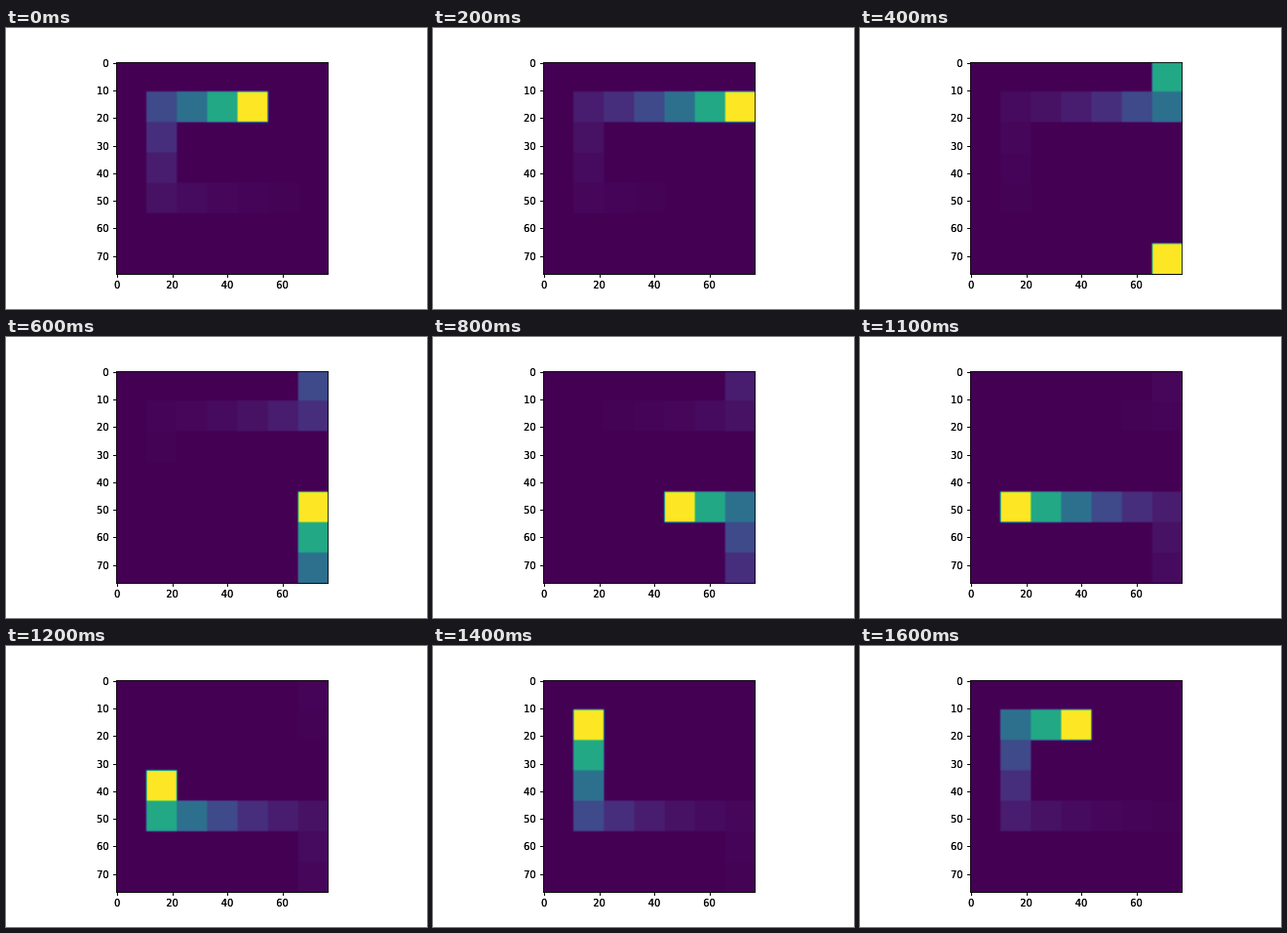
These frames come from a looping animation (432 px wide and 288 px high, 1.7 s). An HTML page with a canvas:

```html
<!DOCTYPE html>
<html lang="en">
<head>
<meta charset="utf-8">
<title>Fading trail on a grid</title>
<style>
  html, body { margin: 0; width: 100%; height: 100%; overflow: hidden; background: #fff; }
  canvas, svg { position: absolute; left: 0; top: 0; display: block; }
  text { font: 10px "DejaVu Sans", sans-serif; fill: #000; }
</style>
</head>
<body>
<canvas id="heat" width="432" height="288"></canvas>
<svg id="axes" width="432" height="288" viewBox="0 0 432 288"></svg>
<script>
const STEP = 100, DECAY = 0.6;
const CELLS = 7, UNITS = 11;             // 7 x 7 cells, 11 data units each
const BOX = { x: 113, y: 35, w: 218, h: 217 };
const ORIGIN_Y = 34, SCALE = 218 / (CELLS * UNITS);

// The walk wraps from the top edge to the bottom one.
const path = [];
function walk(x, y, dx, dy, n) {
  for (let i = 0; i < n; i++) path.push([x + dx * i, (y + dy * i + CELLS) % CELLS]);
}
walk(4, 1, 1, 0, 2);
walk(6, 1, 0, -1, 4);
walk(6, 4, -1, 0, 5);
walk(1, 4, 0, -1, 3);
walk(1, 1, 1, 0, 3);

// Colour map: level, red, green, blue
const stops = [
  [0, 68, 1, 84], [4, 70, 7, 90], [11, 71, 17, 100], [19, 72, 28, 110],
  [33, 71, 46, 124], [55, 62, 74, 137], [92, 45, 112, 142], [128, 33, 145, 140],
  [153, 34, 168, 132], [191, 94, 201, 98], [230, 189, 223, 38], [255, 253, 231, 37]
];
const palette = Array.from({ length: 256 }, (_, level) => {
  const i = Math.max(1, stops.findIndex(s => s[0] >= level));
  const a = stops[i - 1], b = stops[i];
  const k = (level - a[0]) / (b[0] - a[0]);
  return [1, 2, 3].map(c => Math.round(a[c] + (b[c] - a[c]) * k));
});

// For one pixel: the two nearest cells and a smooth weight between them.
function sample(offset) {
  const pos = (offset + 0.5) / SCALE;
  const edge = Math.min(CELLS - 1, Math.max(1, Math.round(pos / UNITS)));
  const d = Math.max(-0.5, Math.min(0.5, pos - edge * UNITS));
  return [edge - 1, edge, 0.5 + 0.5 * Math.sin(Math.PI * d)];
}
const cols = Array.from({ length: BOX.w }, (_, i) => sample(i));
const rows = Array.from({ length: BOX.h }, (_, i) => sample(i + BOX.y - ORIGIN_Y));

const ctx = document.getElementById("heat").getContext("2d");
const image = ctx.createImageData(BOX.w, BOX.h);

function draw(step) {
  const grid = Array.from({ length: CELLS }, () => new Array(CELLS).fill(0));
  path.forEach(([x, y], i) => {
    const age = (step - i + path.length) % path.length;
    grid[y][x] = DECAY ** age;
  });
  let p = 0;
  for (const [top, bottom, v] of rows) {
    const line = grid[top].map((a, i) => a + (grid[bottom][i] - a) * v);
    for (const [left, right, u] of cols) {
      const value = line[left] + (line[right] - line[left]) * u;
      const rgb = palette[Math.min(255, Math.floor(value * 256))];
      image.data[p++] = rgb[0];
      image.data[p++] = rgb[1];
      image.data[p++] = rgb[2];
      image.data[p++] = 255;
    }
  }
  ctx.putImageData(image, BOX.x, BOX.y);
}

function drawAxes() {
  const parts = [];
  const bar = (x, y, w, h, o) =>
    parts.push(`<rect x="${x}" y="${y}" width="${w}" height="${h}" opacity="${o}"/>`);
  // Doubled glyphs give the labels their heavy look.
  const label = (x, y, anchor, text) => {
    const tag = `<text x="${x}" y="${y}" text-anchor="${anchor}">${text}</text>`;
    parts.push(tag, tag);
  };
  const unit = 217.44 / 77;

  bar(113, 35, 1, 218, 0.8);
  bar(330, 35, 1, 218, 0.8);
  bar(113, 35, 218, 1, 0.8);
  bar(113, 252, 218, 1, 0.96);
  for (let v = 0; v <= 70; v += 10) {
    const y = Math.round(35.97 + v * unit);
    bar(110, y, 3, 1, 0.96);
    label(105.7, y + 4, "end", v);
  }
  for (let v = 0; v <= 60; v += 20) {
    const x = 114.09 + v * unit;
    bar(Math.round(x), 253, 1, 3, 0.96);
    label(x.toFixed(2), 267, "middle", v);
  }
  document.getElementById("axes").innerHTML = parts.join("");
}

const start = performance.now();
let shown = -1;
function tick() {
  const step = Math.floor((performance.now() - start) / STEP) % path.length;
  if (step !== shown) draw(shown = step);
  requestAnimationFrame(tick);
}
drawAxes();
tick();
</script>
</body>
</html>
```
